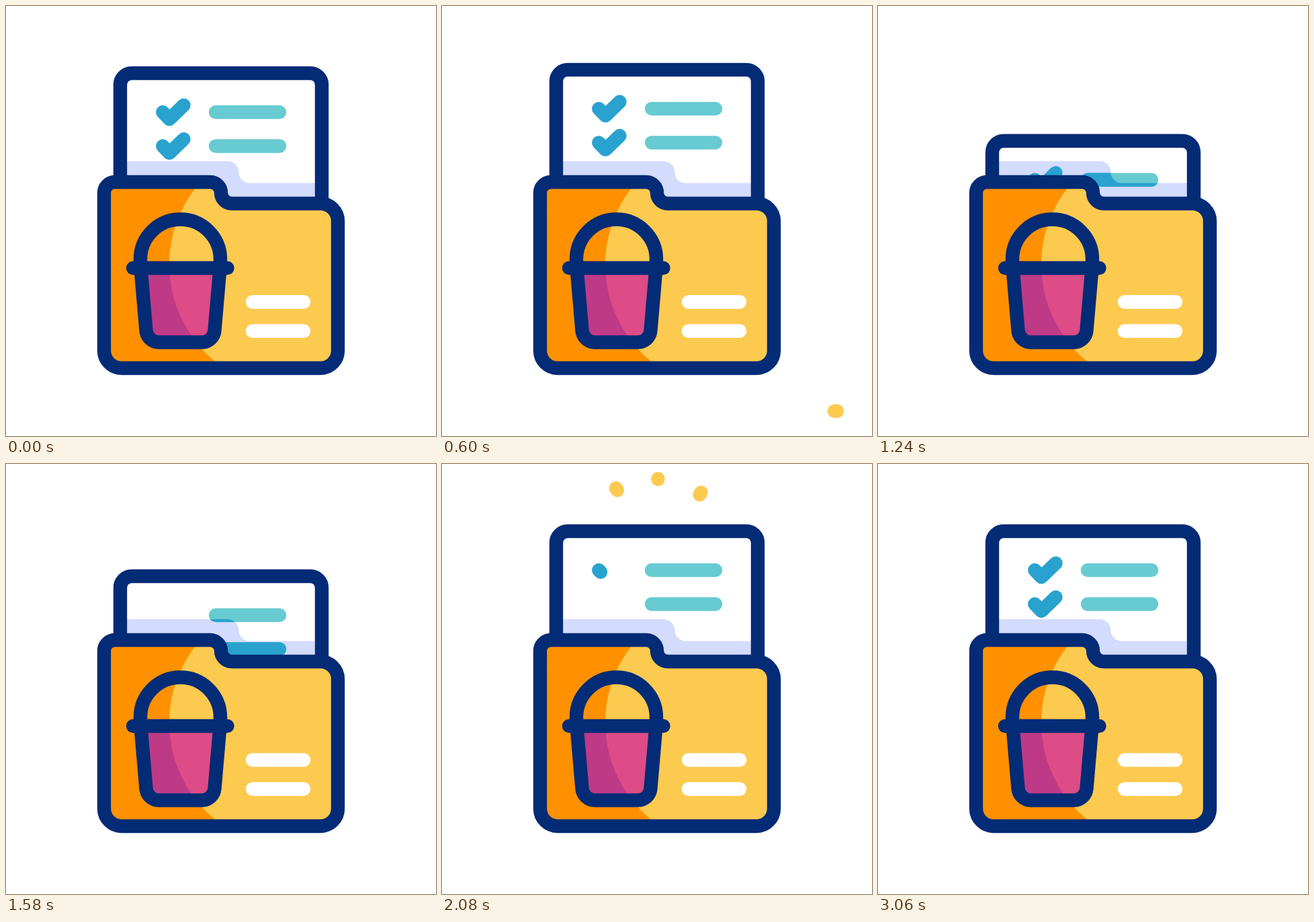
Animation, 640 px wide and 640 px high, one loop 3.26 s. Source, as an HTML page with a canvas:

```html
<!DOCTYPE html>
<html lang="en">
<head>
<meta charset="utf-8">
<title>Folder</title>
<style>
html, body { margin: 0; width: 100%; height: 100%; overflow: hidden; background: #fff; }
canvas { display: block; width: 640px; height: 640px; }
</style>
</head>
<body>
<canvas id="stage" width="640" height="640"></canvas>
<script>
const ctx = document.getElementById('stage').getContext('2d');
const LOOP = 3260, STEP = 20;
const NAVY = '#042b76', YELLOW = '#fdca50', ORANGE = '#ff9100', TEAL = '#67cbd1',
  BLUE = '#29a2d0', SHADE = '#d3dcfd', PINK = '#dd4c86', PLUM = '#be3a87', WHITE = '#fff';

const clamp = u => Math.max(0, Math.min(1, u));
const part = (t, a, b) => clamp((t - a) / (b - a));
const smooth = u => u * u * (3 - 2 * u);
const mix = (a, b, u) => a + (b - a) * u;

const folder = new Path2D('M162 262H304A16 16 0 0 1 320 278A16 16 0 0 0 336 294H468' +
  'A26 26 0 0 1 494 320V513A26 26 0 0 1 468 539H172A26 26 0 0 1 146 513V278A16 16 0 0 1 162 262Z');
const paper = new Path2D('M170 380V117A17 17 0 0 1 187 100H453A17 17 0 0 1 470 117V380Z');
const shade = new Path2D('M160 231H330A16.5 16.5 0 0 1 346.5 247.5A16 16 0 0 0 362.5 263.5H480V400H160Z');
const handle = new Path2D('M200 390V377A59.5 59.5 0 0 1 319 377V390');
const body = new Path2D();
body.moveTo(200.5, 390);
body.arcTo(210, 500.5, 259, 500.5, 19);
body.arcTo(309, 500.5, 318.5, 390, 19);
body.lineTo(318.5, 390);
const disc = new Path2D();
disc.arc(429.5, 385, 186.5, 0, 7);

function fill(path, color) {
  ctx.fillStyle = color;
  ctx.fill(path);
}

function stroke(path, color = NAVY) {
  ctx.strokeStyle = color;
  ctx.stroke(path);
}

function line(x1, y1, x2, y2, color) {
  const p = new Path2D();
  p.moveTo(x1, y1);
  p.lineTo(x2, y2);
  stroke(p, color);
}

function clipped(path, draw) {
  ctx.save();
  ctx.clip(path);
  draw();
  ctx.restore();
}

// Part of a straight stroke between two progress values.
function dash(x1, y1, x2, y2, tail, head) {
  if (head <= 0 || tail >= 1) return;
  line(mix(x1, x2, tail), mix(y1, y2, tail), mix(x1, x2, head), mix(y1, y2, head), YELLOW);
}

function check(y, u) {
  if (u <= 0) return;
  const bend = 0.33, a = clamp(u / bend), b = clamp((u - bend) / (1 - bend));
  const p = new Path2D();
  p.moveTo(233.3, y);
  p.lineTo(mix(233.3, 243.3, a), mix(y, y + 10.3, a));
  if (b > 0) p.lineTo(mix(243.3, 264.5, b), mix(y + 10.3, y - 10.3, b));
  stroke(p, BLUE);
}

function tilt(t) {
  if (t < 410) return -9.1 * smooth(part(t, 220, 410));
  return -9.1 * (1 - smooth(part(t, 410, 600)));
}

function paperShift(t) {
  if (t < 760) {
    const u = part(t, 590, 760);
    return -45 * u * (2 - u);
  }
  if (t < 1400) {
    const u = part(t, 760, 1400);
    return mix(-45, 140, 0.6 * u + 0.4 * smooth(u));
  }
  return mix(140, 0, smooth(part(t, 1400, 1750)));
}

function bars(color) {
  for (const y of [158, 208.5]) line(312, y, 407, y, color);
}

function drawPaper(t) {
  const dy = paperShift(t);
  const shifted = draw => {
    ctx.save();
    ctx.translate(0, dy);
    draw();
    ctx.restore();
  };
  const sheet = new Path2D();
  sheet.addPath(paper, new DOMMatrix([1, 0, 0, 1, 0, dy]));
  fill(sheet, WHITE);
  clipped(sheet, () => {
    fill(shade, SHADE);
    shifted(() => bars(TEAL));
    clipped(shade, () => shifted(() => bars(BLUE)));
    shifted(() => {
      const redraw = t >= 1400;
      check(158, redraw ? smooth(part(t, 2020, 2340)) : 1);
      check(208.5, redraw ? smooth(part(t, 2350, 2680)) : 1);
    });
  });
  stroke(sheet);
}

function drawFolder() {
  fill(folder, ORANGE);
  clipped(folder, () => fill(disc, YELLOW));
  stroke(folder);
  fill(body, PLUM);
  clipped(body, () => fill(disc, PINK));
  stroke(body);
  stroke(handle);
  line(189, 390, 329.5, 390, NAVY);
  line(367, 440.5, 443, 440.5, WHITE);
  line(367, 483.7, 443, 483.7, WHITE);
}

function drawSparks(t) {
  dash(588, 603, 418, 603, smooth(part(t, 680, 910)), smooth(part(t, 580, 800)));
  const head = smooth(part(t, 1740, 1900));
  const side = smooth(part(t, 1860, 2130));
  dash(321.5, 62, 321.5, 22, smooth(part(t, 1860, 2100)), head);
  dash(280, 70, 259, 36, side, head);
  dash(363, 76, 385.5, 42.5, side, head);
}

function render(t) {
  ctx.fillStyle = WHITE;
  ctx.fillRect(0, 0, 640, 640);
  ctx.lineWidth = 20.4;
  ctx.lineCap = ctx.lineJoin = 'round';
  ctx.save();
  ctx.translate(172, 521);
  ctx.rotate(tilt(t) * Math.PI / 180);
  ctx.translate(-172, -521);
  drawPaper(t);
  drawFolder();
  ctx.restore();
  drawSparks(t);
}

const start = performance.now();
function frame() {
  const t = (performance.now() - start) % LOOP;
  render(Math.floor(t / STEP) * STEP);
  requestAnimationFrame(frame);
}
frame();
</script>
</body>
</html>
```
